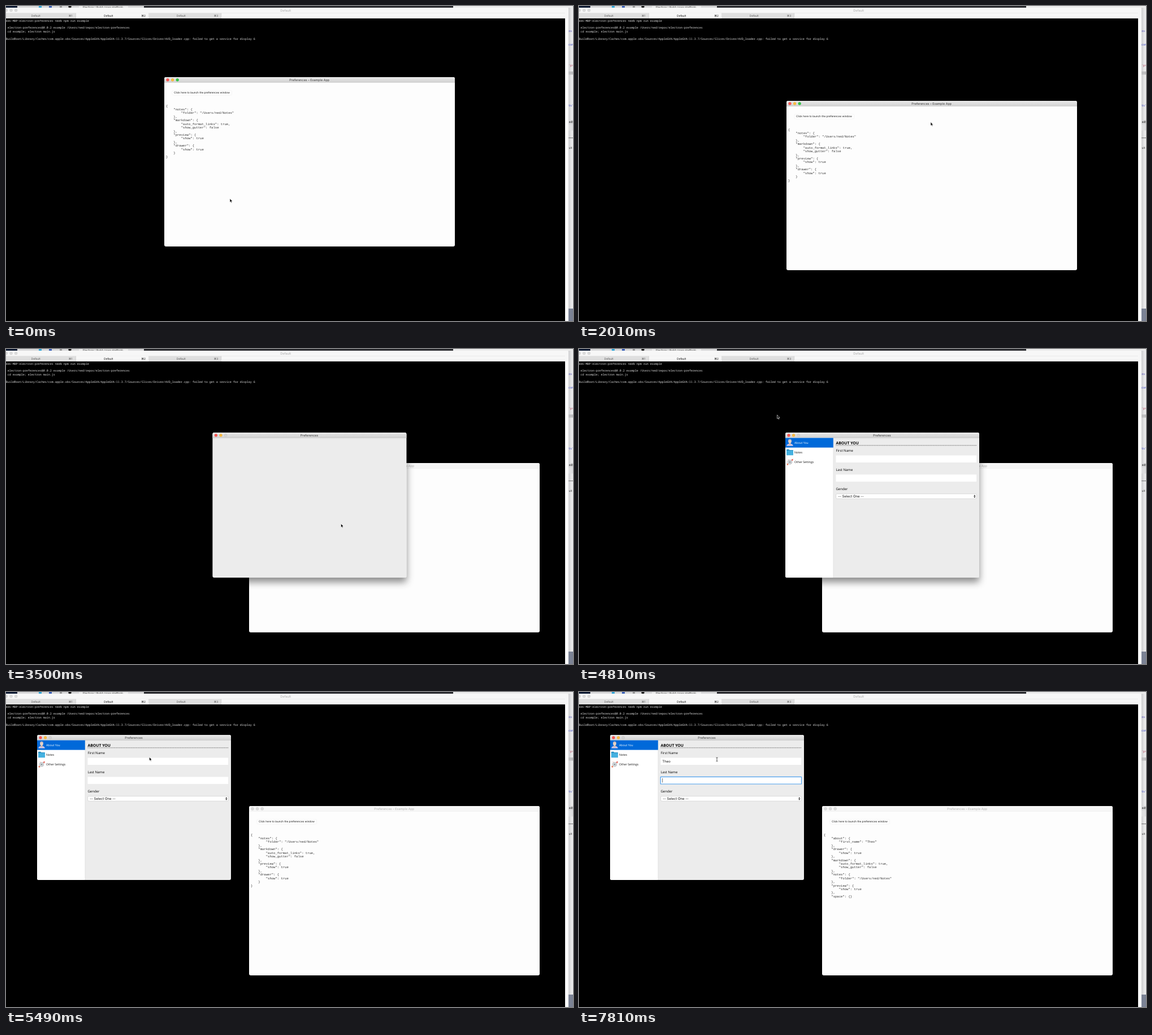
An HTML page that plays this animation: 1003x558 px, repeating every 8 s.

```html
<!DOCTYPE html>
<html lang="en">
<head>
<meta charset="utf-8">
<title>Preferences demo</title>
<style>
html, body { margin: 0; width: 100%; height: 100%; overflow: hidden; background: #000; }
svg { display: block; }
text { white-space: pre; text-rendering: geometricPrecision; }
.ui { font-family: Inter, "DejaVu Sans", sans-serif; }
.form { font-family: "Open Sans", "Noto Sans", sans-serif; }
.term { font-family: "Noto Sans Mono", "DejaVu Sans Mono", monospace; }
.code { font-family: "Liberation Mono", monospace; }
.mid { text-anchor: middle; }
</style>
</head>
<body>
<svg id="stage" width="1003" height="558" viewBox="0 0 1003 558">
  <defs>
    <linearGradient id="bar" x2="0" y2="1">
      <stop offset="0" stop-color="#eaeaea"/><stop offset="1" stop-color="#d1d1d1"/>
    </linearGradient>
    <linearGradient id="edge">
      <stop offset="0" stop-color="#cfcfd1"/><stop offset="1" stop-color="#f3f3f4"/>
    </linearGradient>
    <filter id="shadow" x="-10%" y="-10%" width="120%" height="125%">
      <feDropShadow dx="0" dy="8" stdDeviation="6.5" flood-color="#000" flood-opacity=".45"/>
    </filter>
  </defs>
</svg>
<script>
const LOOP = 8000;
const NS = "http://www.w3.org/2000/svg";
const stage = document.getElementById("stage");

function add(parent, tag, attrs) {
  const node = document.createElementNS(NS, tag);
  for (const key in attrs) node.setAttribute(key, attrs[key]);
  parent.appendChild(node);
  return node;
}
const group = parent => add(parent, "g", {});
const box = (p, x, y, width, height, fill, more) => add(p, "rect", { x, y, width, height, fill, ...more });
const dot = (p, cx, cy, r, fill, more) => add(p, "circle", { cx, cy, r, fill, ...more });
const shape = (p, d, fill, more) => add(p, "path", { d, fill, ...more });
function label(p, x, y, size, text, cls, fill = "#111", more) {
  const node = add(p, "text", { x, y, "font-size": size, class: cls, fill, ...more });
  node.textContent = text;
  return node;
}
const show = (node, on) => node.setAttribute("display", on ? "inline" : "none");
const move = (node, [x, y]) => node.setAttribute("transform", `translate(${x} ${y})`);

function lights(p, colors, y = 4.8, x = 6) {
  colors.forEach((c, i) => dot(p, x + i * 8.6, y, 2.6, c, { stroke: "#000", "stroke-opacity": .12, "stroke-width": .4 }));
}
const GREY = ["#dcdcdc", "#dcdcdc", "#dcdcdc"];
const barPath = w => `M0 9.5V3Q0 0 3 0H${w - 3}Q${w} 0 ${w} 3V9.5Z`;

// Desktop strips around the terminal
function drawDesktop(p) {
  box(p, 0, 0, 1003, 558, "#ececec");
  box(p, 0, 0, 20, 3, "#0d1b33");
  box(p, 20, 0, 224, 3, "#d9d9da");
  box(p, 244, 0, 547, 3, "#2a2b2f");
  box(p, 58, 0, 5, 3, "#35a7d8");
  box(p, 76, 0, 5, 3, "#3c62b8");
  box(p, 95, 0, 4, 3, "#9a9a9a");
  dot(p, 113, 1, 2.6, "#222");
  box(p, 129, 0, 87, 3, "#ebebeb");
  label(p, 136, 3.6, 5, "Electron | Build cross platform", "ui", "#333");

  box(p, 995, 3, 8, 555, "url(#edge)");
  [[46, "ro", "#3b35b0"], [70, "con", "#2733c0"], [107, "'p>", "#b03a55"],
   [178, "ts'", "#2733c0"]].forEach(([y, s, c]) => label(p, 995, y, 5, s, "term", c));
  box(p, 995, 116, 8, 5.5, "#bfbfc1");
  box(p, 995, 202, 8, 7.5, "#d4d4d6");
  label(p, 995.5, 207.2, 5, "adr", "ui", "#222");
  box(p, 995, 209.5, 8, 11, "#dedee0");
  box(p, 995, 233.3, 8, .8, "#555");
  label(p, 995.5, 253.3, 5, "ult", "ui", "#333");
  box(p, 995, 536, 8, 22, "#7b8294");
}

function drawTerminal(p) {
  shape(p, "M0 3H992Q995 3 995 6V558H0Z", "#f7f7f7");
  lights(p, GREY, 7.5, .4);
  label(p, 494.7, 9.5, 5.5, "Default", "ui mid", "#a9a9a9");
  box(p, 0, 12, 989, .5, "#dedede");
  ["#dfdfdf", "#f7f7f7", "#dfdfdf"].forEach((fill, i) => {
    const x = i * 128.5 - 4.5, ink = i === 1 ? "#000" : "#555";
    box(p, x, 12.5, 128.5, 9.5, fill);
    box(p, x + 128.2, 12.5, .4, 9.5, "#c8c8c8");
    label(p, x + 57.3, 18.7, 4.7, "Default", "ui mid", ink);
    label(p, x + 115.3, 18.7, 4.7, "⌘" + (i + 1), "ui", ink);
  });
  box(p, 0, 22, 989, 536, "#000");
  box(p, 989, 22, 6, 536, "#fafafa");
  ["eds-MBP:electron-preferences ned$ npm run example", "",
   " electron-preferences@0.0.2 example /Users/ned/repos/electron-preferences",
   " cd example; electron main.js", "",
   "BuildRoot/Library/Caches/com.apple.xbs/Sources/AppleGVA/AppleGVA-11.3.7/Sources/Slices/Driver/AVD_loader.cpp: failed to get a service for display 6"
  ].forEach((s, i) => label(p, -.3, 27.6 + i * 6.43, 5, s, "term", "#e4e4e4"));
}

// Example app window
function drawApp(p) {
  box(p, 0, 0, 514, 300, "#fdfdfd", { rx: 3 });
  const bars = [true, false].map(active => {
    const g = group(p);
    shape(g, barPath(514), active ? "url(#bar)" : "#f6f6f6");
    box(g, 0, 9.2, 514, .4, active ? "#bcbcbc" : "#e6e6e6");
    lights(g, active ? ["#fc5753", "#fdbc40", "#33c748"] : GREY);
    label(g, 256.7, 6.8, 5.45, "Preferences – Example App", "ui mid", active ? "#3a3a3a" : "#b2b2b2");
    return g;
  });
  box(p, 14, 23.8, 105.5, 8, "#fff", { rx: 1.6, stroke: "#e6e6e6", "stroke-width": .4 });
  label(p, 17, 29.2, 4.7, "Click here to launch the preferences window", "ui", "#111");
  const lines = Array.from({ length: 18 }, (_, i) => label(p, 3, 52.5 + i * 6.43, 5.571, "", "code", "#333"));
  return { bars, lines };
}

const ICONS = [
  p => {
    shape(p, "M2.3 23.8Q2.5 20 8 19.6Q13.5 20 13.8 23.8Z", "#c9c3e6");
    shape(p, "M6.4 18H9.6V20.4L8 22L6.4 20.4Z", "#d9b9a4");
    add(p, "ellipse", { cx: 8, cy: 15.2, rx: 2.9, ry: 3.5, fill: "#e6d2c6" });
    shape(p, "M5 15Q4.8 11.4 8 11.4Q11.2 11.4 11 15Q10 13.2 8 13.3Q6 13.2 5 15Z", "#b8b0bd");
  },
  p => {
    shape(p, "M2 30.3Q2 29.7 2.6 29.7H6.4L7.4 31H13.4Q14 31 14 31.6V40H2Z", "#2b8fc0");
    box(p, 2, 32, 12, 8.3, "#45b1e0", { rx: .6 });
  },
  p => {
    dot(p, 8, 52.3, 3.6, "#d9dde0", { stroke: "#a9afb4", "stroke-width": 1.3, "stroke-dasharray": "1.2 .8" });
    dot(p, 8, 52.3, 1.4, "#8c959b");
    shape(p, "M10.2 48.2L13.8 46.6L13 50.4Z", "#e0574d");
    shape(p, "M2.4 55.6L4.6 54.6L5.6 57.2L3 57.8Z", "#e8795a");
    shape(p, "M4 48L5.6 47.2L6 48.8Z", "#e9a08f");
  }
];

// Preferences window
function drawPrefs(p) {
  box(p, 0, 0, 343, 257, "#ececec", { rx: 3, filter: "url(#shadow)" });
  shape(p, barPath(343), "url(#bar)");
  box(p, 0, 9.1, 343, .4, "#bcbcbc");
  lights(p, ["#fc5753", "#fdbc40", "#d3d3d3"]);
  label(p, 171, 6.8, 5.5, "Preferences", "ui mid", "#3a3a3a");

  const body = group(p);
  shape(body, "M0 9.5H84.8V257H3Q0 257 0 254Z", "#fff");
  box(body, 84.8, 9.5, .4, 247.5, "#d0d0d0");
  box(body, 0, 9.5, 84.8, 17.1, "#0069d9");
  ["About You", "Notes", "Other Settings"].forEach((s, i) => {
    ICONS[i](body);
    label(body, 16, 20 + i * 17.14, 5.143, s, "form", i ? "#111" : "#fff");
  });
  label(body, 89.5, 20.9, 6.857, "ABOUT YOU", "form", "#000", { "font-weight": 700 });
  add(body, "path", { d: "M89.5 22.8H338.3", stroke: "#222", "stroke-width": .6, "stroke-dasharray": "1.7 .9" });
  [["First Name", 34.1], ["Last Name", 68.2], ["Gender", 101.9]].forEach(([s, y]) => label(body, 89.5, y, 6, s, "form", "#000"));

  const rings = [40.5, 74.4].map(y => {
    box(body, 89.5, y, 248.7, 12.5, "#fff");
    return box(body, 89.2, y - .1, 249.3, 12.7, "none", { stroke: "#4d9fee", "stroke-width": 1.2, rx: .6 });
  });
  const typed = label(body, 92.3, 49.1, 6, "", "ui", "#111");
  const caret = box(body, 0, 0, .6, 7.6, "#111");

  box(body, 89.6, 108.6, 248.6, 8.6, "#fff", { rx: 1.8, stroke: "#bdbdbd", "stroke-width": .5 });
  label(body, 93.3, 115.1, 6, "-- Select One --", "ui", "#111");
  shape(body, "M333.2 112.4L334.8 110.2L336.4 112.4ZM333.2 113.5L334.8 115.7L336.4 113.5Z", "#222");
  return { body, rings, typed, caret };
}

const layers = Array.from({ length: 5 }, () => group(stage));
const [desk, appBox, prefBox, arrow, beam] = layers;
drawDesktop(desk);
drawTerminal(desk);
const app = drawApp(appBox);
const prefs = drawPrefs(prefBox);
shape(arrow, "M0 0V6.5L1.5 5.2L2.5 7.5L3.6 7L2.6 4.8H4.6Z", "#000", { stroke: "#fff", "stroke-width": .6, "stroke-linejoin": "round" });
shape(beam, "M-1.5 -3.3Q0 -3.3 0 -2.4Q0 -3.3 1.5 -3.3M0 -2.4V2.6M-1.5 3.5Q0 3.5 0 2.6Q0 3.5 1.5 3.5", "none", { stroke: "#111", "stroke-width": .7 });

function settings(name) {
  const notes = { folder: "/Users/ned/Notes" };
  const markdown = { auto_format_links: true, show_gutter: false };
  const on = { show: true };
  return name
    ? { about: { first_name: name }, drawer: on, markdown, notes, preview: on, space: {} }
    : { notes, markdown, preview: on, drawer: on };
}

// Each step overrides the state it follows
const STEPS = [
  { at: 0, mouse: [396, 341.2], app: [280, 126], prefs: null, form: false, field: -1, caret: null, name: "", beam: false },
  { at: 560, mouse: [449.7, 252.3] },
  { at: 1130, mouse: [474.3, 137.3] },
  { at: 1420, mouse: [474.3, 132.3] },
  { at: 1720, mouse: [554.5, 171.3] },
  { at: 2010, mouse: [622, 205.6], app: [367, 168] },
  { at: 2310, mouse: [624.5, 208], app: [430, 202] },
  { at: 2700, mouse: [529.4, 227.4] },
  { at: 3120, mouse: [530.5, 231] },
  { at: 3500, mouse: [592.5, 309.5], prefs: [365.4, 148] },
  { at: 3800, mouse: [598.6, 162], form: true },
  { at: 4180, mouse: [601, 155.7] },
  { at: 4510, mouse: [602.5, 152.3] },
  { at: 4810, mouse: [350.5, 116.8], prefs: [365, 148] },
  { at: 5140, mouse: [292, 80.3], prefs: [104.5, 108] },
  { at: 5490, mouse: [253.5, 115.3], prefs: [55, 76] },
  { at: 5880, mouse: [244, 119.3], beam: true },
  { at: 6260, field: 0, caret: 92.5 },
  { at: 6860, caret: null },
  { at: 7160, name: "Th", caret: 99.7 },
  { at: 7460, name: "Theo", caret: 106.8 },
  { at: 7810, field: 1, caret: 92.5 }
];

function draw(ms) {
  const s = Object.assign({}, ...STEPS.filter(step => step.at <= ms));
  move(appBox, s.app);
  show(app.bars[0], !s.prefs);
  show(app.bars[1], s.prefs);
  const lines = JSON.stringify(settings(s.name), null, 4).split("\n");
  app.lines.forEach((node, i) => { node.textContent = lines[i] || ""; });

  show(prefBox, s.prefs);
  if (s.prefs) move(prefBox, s.prefs);
  show(prefs.body, s.form);
  prefs.rings.forEach((ring, i) => show(ring, i === s.field));
  prefs.typed.textContent = s.name;
  show(prefs.caret, s.caret !== null);
  move(prefs.caret, [s.caret || 0, s.field === 1 ? 76.8 : 43]);

  show(arrow, !s.beam);
  show(beam, s.beam);
  move(s.beam ? beam : arrow, s.mouse);
}

const start = performance.now();
function tick() {
  draw((performance.now() - start) % LOOP);
  requestAnimationFrame(tick);
}
tick();
</script>
</body>
</html>
```
